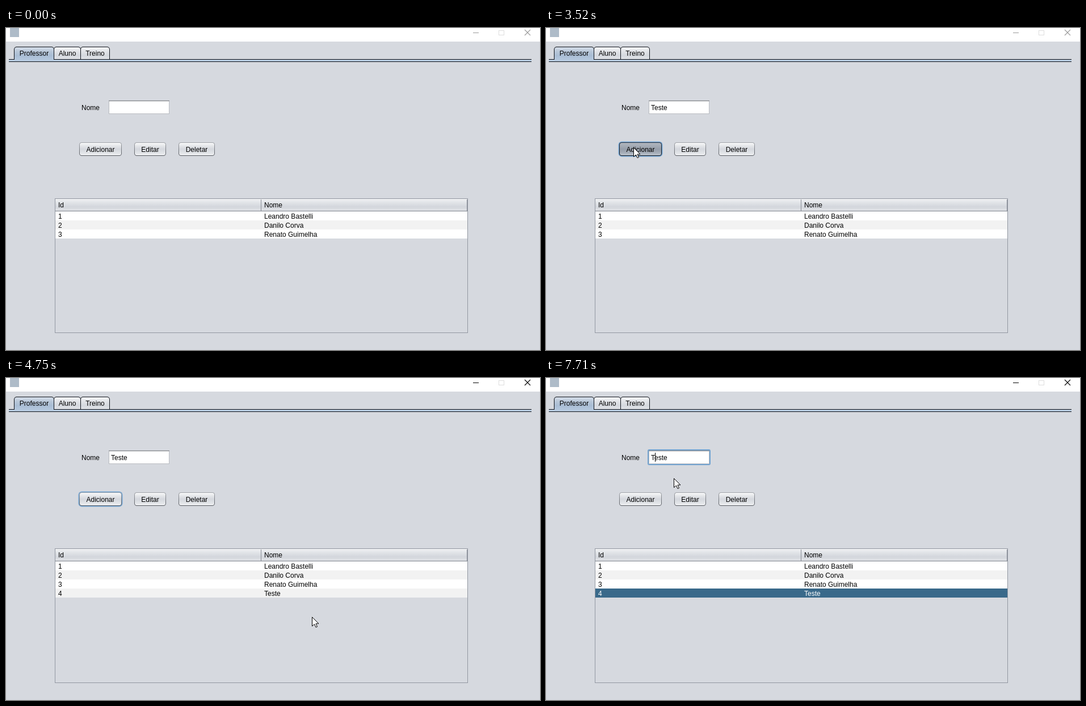
An HTML page with a canvas for the animation above (8000 ms loop, 941 by 569 pixels).

```html
<!DOCTYPE html>
<html lang="pt">
<head>
<meta charset="utf-8">
<style>
html, body { margin: 0; height: 100%; overflow: hidden; background: #d6d9df; }
canvas { display: block; }
</style>
</head>
<body>
<canvas id="stage" width="941" height="569"></canvas>
<script>
const ctx = document.getElementById('stage').getContext('2d');
const LOOP = 8000;
const BG = '#d6d9df';
const FOCUS = '#73a4d1';
const people = ['Leandro Bastelli', 'Danilo Corva', 'Renato Guimelha'];

// Pointer path: time, x, y
const path = [
  [370, 855, 560], [500, 745, 475], [620, 630, 390], [780, 470, 232], [940, 255, 170], [1060, 228, 144],
  [1290, 228, 144], [1430, 236, 199],
  [2790, 236, 199], [2960, 190, 228], [3120, 148, 238], [3280, 154, 211],
  [3610, 154, 211], [3700, 408, 218], [3780, 495, 250], [3900, 484, 374], [4100, 530, 414], [4380, 545, 431],
  [4600, 545, 431], [4750, 539, 422], [5150, 474, 379],
  [5730, 474, 379], [5850, 445, 370], [6130, 320, 230], [6470, 241, 110], [6590, 241, 120],
  [6800, 241, 120], [6960, 225, 177]
];
// Time at which each letter of the word is typed
const word = 'Teste', typed = [1930, 2130, 2290, 2370, 2450];
const buttons = [['Adicionar', 129, 75], ['Editar', 226, 56], ['Deletar', 304, 64]];

const within = (t, a, b) => t >= a && t < b;
const clamp = v => Math.max(0, Math.min(1, v));

function pointerAt(t) {
  if (t < path[0][0]) return null;
  const i = path.findIndex(p => p[0] > t);
  if (i < 0) return path[path.length - 1].slice(1);
  const [t0, x0, y0] = path[i - 1], [t1, x1, y1] = path[i];
  const k = (t - t0) / (t1 - t0);
  return [Math.round(x0 + (x1 - x0) * k), Math.round(y0 + (y1 - y0) * k)];
}

function rect(x, y, w, h, fill) {
  ctx.fillStyle = fill;
  ctx.fillRect(x, y, w, h);
}

function frame(x, y, w, h, color) {
  ctx.strokeStyle = color;
  ctx.lineWidth = 1;
  ctx.strokeRect(x + .5, y + .5, w - 1, h - 1);
}

function rounded(x, y, w, h, r, fill) {
  ctx.beginPath();
  ctx.roundRect(x, y, w, h, r);
  ctx.fillStyle = fill;
  ctx.fill();
}

function text(str, x, y, color = '#000', align = 'left') {
  ctx.font = '12px "Liberation Sans", Arial, sans-serif';
  ctx.textAlign = align;
  ctx.fillStyle = color;
  ctx.fillText(str, x, y);
}

function shade(y, h, ...colors) {
  const g = ctx.createLinearGradient(0, y, 0, y + h);
  colors.forEach((c, i) => g.addColorStop(i / (colors.length - 1), c));
  return g;
}

function cross(x, y, color) {
  ctx.beginPath();
  ctx.moveTo(x, y); ctx.lineTo(x + 10, y + 10);
  ctx.moveTo(x + 10, y); ctx.lineTo(x, y + 10);
  ctx.strokeStyle = color;
  ctx.lineWidth = 1.1;
  ctx.stroke();
}

const looks = {
  normal: [['#a3a6ab', '#55595f'], ['#f8f9fa', '#e4e6e9', '#d5d8de', '#dfe2e6', '#eff0f2']],
  hover: [['#a3a6ab', '#404348'], ['#ffffff', '#f5f6f7', '#e9ebee', '#f3f4f6', '#ffffff']],
  primary: [['#5f7588', '#1f3546'], ['#e4ebf1', '#bccbd8', '#a5b8c9', '#b4c6d5', '#d0e0ed']],
  pressed: [['#26303d', '#10161e'], ['#b0b6bf', '#a4abb5', '#969eaa', '#a2aab5', '#bcc4ce']]
};

function button(label, x, y, w, look, focused) {
  const [edge, face] = looks[look];
  if (focused) rounded(x - 1.5, y - 1.5, w + 3, 27, 6, FOCUS);
  rounded(x, y, w, 24, 4.5, shade(y, 24, ...edge));
  rounded(x + 1, y + 1, w - 2, 22, 3.5, shade(y + 1, 22, ...face));
  text(label, x + w / 2, y + 17, '#000', 'center');
}

function windowBar(active) {
  const ink = active ? '#000' : '#999';
  rect(0, 0, 941, 24, '#fff');
  rect(7, 0, 16, 16, '#aebbc8');
  rect(823, 8, 10, 1, ink);
  frame(868, 4, 10, 9, '#dedede');
  cross(914, 3, ink);
}

function tab(label, x, w, selected) {
  rounded(x, 33, w, 23, [5, 5, 0, 0], '#10141c');
  rounded(x + 1, 34, w - 2, 22, [4, 4, 0, 0], selected
    ? shade(34, 22, '#d5dde8', '#b8c7d9', '#a9bdd4', '#b4c8de')
    : shade(34, 22, '#f4f5f7', '#e2e4e8', '#d5d8de', '#e4e6ea'));
  text(label, x + w / 2, 49, '#000', 'center');
}

function tabs() {
  rect(5, 55, 921, 5, '#0b0f18');
  rect(5, 56, 921, 3, '#b8cce0');
  tab('Aluno', 84, 48);
  tab('Treino', 131, 52);
  rect(84, 55, 99, 1, '#0b0f18');
  tab('Professor', 14, 71, true);
  rect(15, 55, 69, 3, '#b4c8de');
}

function field(t) {
  const focused = within(t, 1190, 3400) || t >= 6760;
  const value = word.slice(0, typed.filter(at => t >= at).length);
  text('Nome', 133, 145);
  if (focused) rounded(179, 126, 111, 28, 3, FOCUS);
  rect(181, 128, 107, 24, '#b9bcc1');
  rect(182, 129, 105, 22, '#fff');
  rect(181, 128, 107, 1, '#85888d');
  rect(182, 129, 105, 1, '#d5d6d8');
  text(value, 185, 145);
  if (!focused) return;

  // The caret blinks every half second, restarting at each keystroke
  const since = Math.max(...[1190, 6760, 7710, ...typed].filter(at => t >= at));
  if (Math.floor((t - since) / 490) % 2) return;
  const before = t >= 6760 ? (t >= 7710 ? 'T' : '') : value;
  rect(185 + Math.round(ctx.measureText(before).width), 132, 1, 16, '#000');
}

function table(t) {
  const rows = t >= 4600 ? [...people, word] : people;
  rect(87, 302, 726, 21, shade(302, 21, '#f0f1f3', '#e0e3e7', '#d3d6dc', '#e0e2e6'));
  rect(87, 323, 726, 1, '#7d828c');
  rect(449, 303, 1, 20, '#878c96');
  rect(812, 303, 1, 20, '#878c96');
  text('Id', 92, 317);
  text('Nome', 455, 317);
  rows.forEach((name, i) => {
    const y = 324 + 16 * i, selected = i === 3 && t >= 5280;
    const ink = selected ? '#fff' : '#000';
    rect(87, y, 726, 16, selected ? '#39698a' : i % 2 ? '#f2f2f2' : '#fff');
    if (selected && t < 6760) frame(450, y, 363, 16, FOCUS);
    text(i + 1, 92, y + 13, ink);
    text(name, 455, y + 13, ink);
  });
  frame(86, 301, 728, 238, '#9297a1');
}

function dialog(t) {
  if (!within(t, 3550, 4650)) return;
  const shown = t < 4500 ? clamp((t - 3530) / 160) : clamp((4650 - t) / 150);
  const scale = .92 + .08 * shown;
  ctx.save();
  ctx.globalAlpha = shown;
  ctx.translate(473, 392.5);
  ctx.scale(scale, scale);
  ctx.translate(-473, -392.5);

  ctx.shadowColor = 'rgba(0,0,0,.42)';
  ctx.shadowBlur = 22;
  ctx.shadowOffsetY = 5;
  rect(341, 317, 264, 151, '#65676b');
  ctx.shadowColor = 'transparent';
  rect(342, 318, 262, 149, BG);
  rect(342, 318, 262, 30, '#fff');
  text('', 0, 0);
  ctx.font = '12px "Open Sans", "Noto Sans", sans-serif';
  ctx.fillStyle = '#000';
  ctx.fillText('Aviso', 350, 338);
  cross(584, 327, '#000');

  rounded(357, 363, 46, 46, 23, '#2b4f94');
  rounded(358, 364, 44, 44, 22, shade(364, 44, '#86a9da', '#4a78c0', '#2853ab', '#3d6cc0'));
  rounded(376, 371, 8, 8, 4, '#fff');
  rect(374, 382, 10, 4, '#fff');
  rect(377, 382, 7, 18, '#fff');
  rect(373, 397, 15, 4, '#fff');

  text('Teste inserido com sucesso', 420, 390);
  button('OK', 545, 426, 42, within(t, 4420, 4510) ? 'pressed' : 'primary', true);
  ctx.restore();
}

function pointer(x, y) {
  ctx.save();
  ctx.translate(x, y);
  ctx.lineWidth = 1;
  if (within(x, 181, 288) && within(y, 128, 152)) {
    rect(0, -7, 1, 15, '#000');
    for (const end of [-8, 8]) {
      rect(-3, end, 3, 1, '#000');
      rect(1, end, 3, 1, '#000');
    }
  } else {
    ctx.beginPath();
    for (const [px, py] of [[0, 0], [0, 16], [4, 12.5], [6.5, 18], [9, 17], [6.5, 11.5], [11.5, 11.5]]) ctx.lineTo(px + .5, py + .5);
    ctx.closePath();
    ctx.fillStyle = '#fff';
    ctx.strokeStyle = '#000';
    ctx.fill();
    ctx.stroke();
  }
  ctx.restore();
}

function draw(t) {
  const at = pointerAt(t);
  const modal = within(t, 3490, 4500);
  rect(0, 0, 941, 569, BG);
  windowBar(t >= 1190 && !modal);
  tabs();
  field(t);
  buttons.forEach(([label, x, w], i) => {
    const over = at && within(at[0], x, x + w) && within(at[1], 202, 226);
    const pressed = !i && within(t, 3400, 3560);
    const hover = modal ? !i : over;
    const focused = !i && (within(t, 3400, 3600) || within(t, 4500, 5280));
    button(label, x, 202, w, pressed ? 'pressed' : hover ? 'hover' : 'normal', focused);
  });
  table(t);
  dialog(t);
  if (at) pointer(...at);
}

function tick() {
  draw(performance.now() % LOOP);
  requestAnimationFrame(tick);
}
tick();
</script>
</body>
</html>
```
